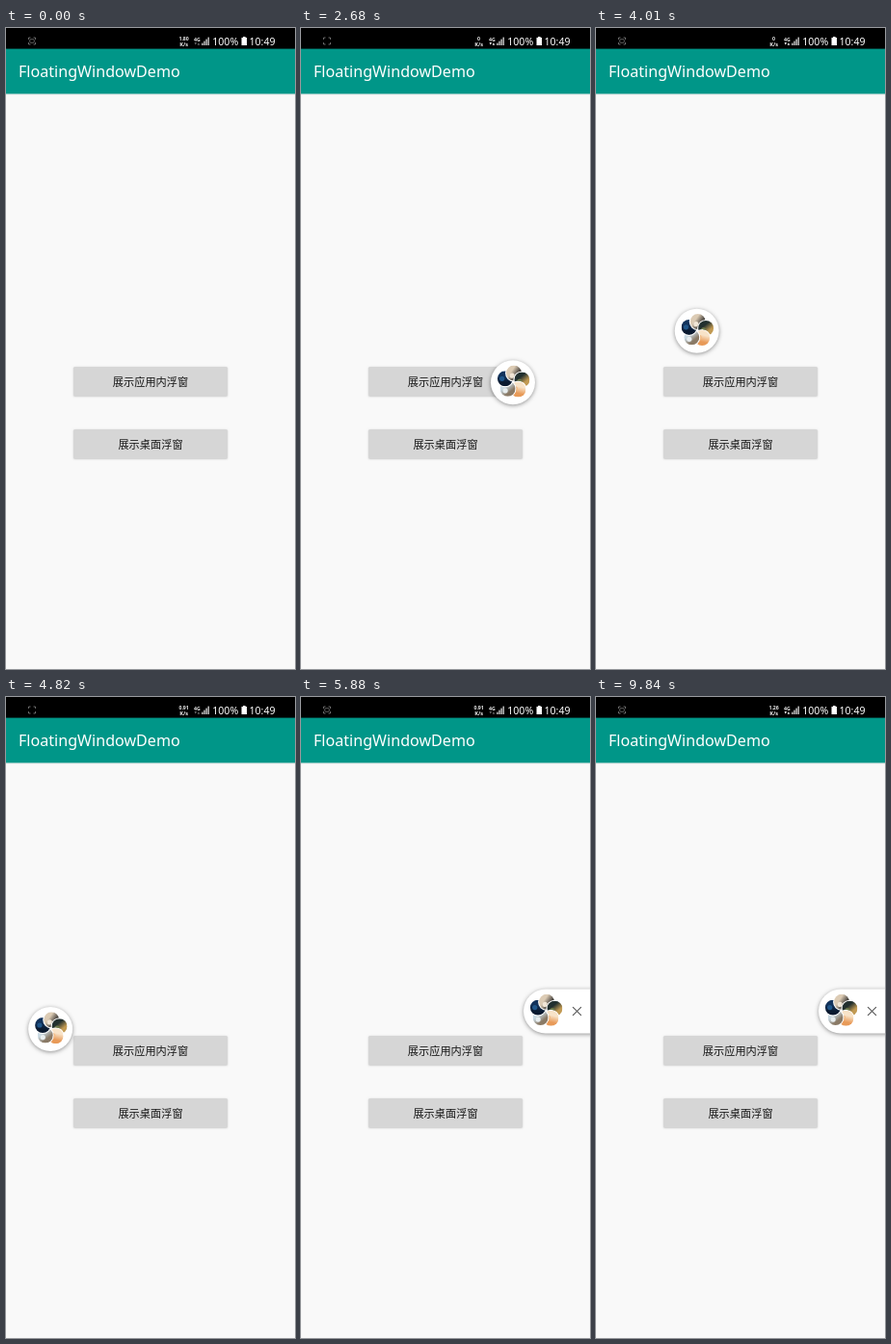
An HTML page with a canvas that plays this animation: 300x666 px, repeating every 9880 ms.

```html
<!DOCTYPE html>
<html lang="zh-CN">
<head>
<meta charset="utf-8">
<title>FloatingWindowDemo</title>
<style>
html, body { margin: 0; width: 100%; height: 100%; overflow: hidden; background: #f9f9f9; }
canvas { display: block; width: 300px; height: 666px; }
</style>
</head>
<body>
<canvas id="stage" width="300" height="666"></canvas>
<script>
const ctx = document.getElementById('stage').getContext('2d');
const LOOP = 9880;
const LATIN = '"Noto Sans", "Open Sans", sans-serif';
const CJK = '"Noto Sans CJK SC", "Noto Sans CJK", sans-serif';
const DOCK_RIGHT = 231, DOCK_LEFT = 23, R = 23;

// Each drag: points [time, left, centre y], then the end of the snap to an edge.
const drags = [
  { path: [[2390, 231, 456], [2520, 222, 438], [2700, 194, 360], [2880, 178, 278], [3030, 176, 242]], end: 3370, dock: DOCK_RIGHT },
  { path: [[3620, 231, 242], [3700, 222, 246], [3850, 160, 279], [4010, 82, 314.5], [4130, 44, 345]], end: 4470, dock: DOCK_LEFT },
  { path: [[4820, 23, 345], [4910, 36, 343], [5060, 130, 333], [5200, 220, 327], [5280, 238, 326.5], [5310, 240, 326.5]], end: 5620, dock: DOCK_RIGHT }
];

// Base tone, second tone, direction between them, and a spot of a third tone.
const photos = [
  ['#dccbb4', '#45413c', 0.6, '#f1e6d6'],
  ['#22302f', '#c29a52', 0.9, '#6b7a4a'],
  ['#f8e3c8', '#e89a58', 1.8, '#f2b980'],
  ['#c9d9e2', '#8a7a66', 0.9, '#e8eef0'],
  ['#12335c', '#0a1a30', 1.6, '#1f568a']
];

const clamp = v => Math.max(0, Math.min(1, v));
const mix = (a, b, p) => a + (b - a) * p;

function along(path, t) {
  let i = 0;
  while (i < path.length - 2 && t >= path[i + 1][0]) i++;
  const a = path[i], b = path[i + 1];
  const p = clamp((t - a[0]) / (b[0] - a[0]));
  return [mix(a[1], b[1], p), mix(a[2], b[2], p)];
}

function floatState(t) {
  let state = { x: DOCK_RIGHT, y: 456, side: 1 };
  for (const d of drags) {
    if (t < d.path[0][0]) break;
    const last = d.path[d.path.length - 1];
    if (t < last[0]) {
      const [x, y] = along(d.path, t);
      state = { x, y, side: 0 };
    } else {
      const p = 1 - Math.pow(1 - clamp((t - last[0]) / (d.end - last[0])), 3);
      state = { x: mix(last[1], d.dock, p), y: last[2], side: d.dock === DOCK_RIGHT ? 1 : -1 };
    }
  }
  return state;
}

function text(str, x, y, font, color, align = 'left') {
  ctx.font = font;
  ctx.fillStyle = color;
  ctx.textAlign = align;
  ctx.fillText(str, x, y);
}

function rect(x, y, w, h, color) {
  ctx.fillStyle = color;
  ctx.fillRect(x, y, w, h);
}

function disc(x, y, r, color) {
  ctx.fillStyle = color;
  ctx.beginPath();
  ctx.arc(x, y, r, 0, 7);
  ctx.fill();
}

function line(color, width, ...points) {
  ctx.strokeStyle = color;
  ctx.lineWidth = width;
  ctx.beginPath();
  points.forEach(([x, y]) => ctx.lineTo(x, y));
  ctx.stroke();
}

function poly(color, ...points) {
  ctx.fillStyle = color;
  ctx.beginPath();
  points.forEach(([x, y]) => ctx.lineTo(x, y));
  ctx.fill();
}

function shadow(alpha, blur, dy) {
  ctx.shadowColor = `rgba(0,0,0,${alpha})`;
  ctx.shadowBlur = blur;
  ctx.shadowOffsetY = dy;
}

function statusBar(t) {
  rect(0, 0, 300, 21.6, '#000');

  // blinking recorder icon
  for (const sx of [-1, 1]) for (const sy of [-1, 1]) {
    const x = 27 + sx * 3.5, y = 13.5 + sy * 3.5;
    line('#6a6a6a', 1, [x - sx * 2, y], [x, y], [x, y - sy * 2]);
  }
  if ((t + 162) % 1000 < 512) {
    ctx.strokeStyle = '#6a6a6a';
    ctx.lineWidth = 0.9;
    ctx.beginPath();
    ctx.ellipse(27, 13.5, 2.6, 1.9, 0, 0, 7);
    ctx.stroke();
  }

  const speed = t < 1200 ? '1.80' : t < 4200 ? '0' : t < 7200 ? '0.91' : '1.26';
  text(speed, 184.6, 13.4, `600 5.2px ${LATIN}`, '#eee', 'center');
  text('K/s', 184.6, 18.6, `600 5.6px ${LATIN}`, '#eee', 'center');

  text('4G', 198.4, 13.6, `600 5.2px ${LATIN}`, '#eee', 'center');
  const busy = (t >= 2450 && t < 4430) || (t >= 6430 && t < 7500) || t >= 8480;
  const arrow = busy ? '#eee' : '#666';
  poly(arrow, [195.6, 15], [198, 15], [196.8, 17.8]);
  poly(arrow, [198.7, 17.8], [201.1, 17.8], [199.9, 15]);

  for (let i = 0; i < 4; i++) {
    const h = 2.4 + i * 2;
    rect(203.2 + i * 2.1, 18 - h, 1.4, h, '#ccc');
  }
  text('100%', 214.2, 18, `500 10.6px ${LATIN}`, '#fff');
  rect(246, 9, 2.6, 1.4, '#fff');
  rect(244.5, 10, 5.5, 8, '#fff');
  text('10:49', 252.6, 18, `500 10.5px ${LATIN}`, '#fff');
}

function toolbar() {
  const g = ctx.createLinearGradient(0, 68, 0, 70.5);
  g.addColorStop(0, 'rgba(0,0,0,.1)');
  g.addColorStop(1, 'rgba(0,0,0,0)');
  rect(0, 68, 300, 2.5, g);
  rect(0, 21, 300, 47.4, '#009688');
  text('FloatingWindowDemo', 13, 51, `16.1px ${LATIN}`, '#fff');
}

function button(y, label, press) {
  const shape = new Path2D();
  shape.roundRect(70, y, 160, 30.6, 1.5);
  ctx.save();
  shadow(0.18, 2, 0.5);
  ctx.fillStyle = '#d6d6d6';
  ctx.fill(shape);
  ctx.restore();
  if (press > 0 && press < 1) {
    ctx.save();
    ctx.clip(shape);
    const fade = 1 - clamp((press - 0.4) / 0.6);
    rect(70, y, 160, 31, `rgba(0,0,0,${0.06 * fade})`);
    disc(150, y + 15.5, mix(12, 84, clamp(press * 1.5)), `rgba(0,0,0,${0.08 * fade})`);
    ctx.restore();
  }
  text(label, 150, y + 19.8, `500 11.2px ${CJK}`, '#161616', 'center');
}

function avatars(cx, cy) {
  const r = 8;
  const spot = i => {
    const a = -Math.PI / 2 + 0.06 + i * Math.PI * 0.4;
    return [cx + 9.2 * Math.cos(a), cy + 9.2 * Math.sin(a)];
  };
  photos.forEach(([base, tone, dir, accent], i) => {
    const [x, y] = spot(i), [nx, ny] = spot(i + 1);
    const face = new Path2D(), cut = new Path2D();
    face.arc(x, y, r, 0, 7);
    cut.rect(cx - 30, cy - 30, 60, 60);
    cut.moveTo(nx + r + 1, ny);
    cut.arc(nx, ny, r + 1, 0, Math.PI * 2);
    const dx = Math.cos(dir) * r, dy = Math.sin(dir) * r;
    const g = ctx.createLinearGradient(x - dx, y - dy, x + dx, y + dy);
    g.addColorStop(0.3, base);
    g.addColorStop(0.75, tone);
    ctx.save();
    ctx.clip(cut, 'evenodd');
    ctx.clip(face);
    rect(x - r, y - r, r * 2, r * 2, g);
    disc(x - dy * 0.4, y + dx * 0.4, 2.6, accent);
    ctx.restore();
  });
}

function floatWindow({ x, y, side }) {
  const cx = x + R;
  ctx.save();
  shadow(0.42, 4.5, 1);
  ctx.fillStyle = '#fff';
  ctx.beginPath();
  if (side === 0) {
    ctx.arc(cx, y, R, 0, 7);
  } else {
    const flat = cx + side * 50;
    ctx.moveTo(flat, y - R);
    ctx.lineTo(cx, y - R);
    ctx.arc(cx, y, R, -Math.PI / 2, Math.PI / 2, side > 0);
    ctx.lineTo(flat, y + R);
    ctx.closePath();
  }
  ctx.fill();
  ctx.restore();

  avatars(cx + 0.5, y - 0.5);
  if (side) {
    const k = cx + side * 32.5, h = 4.4;
    line('#555', 1.1, [k - h, y - h], [k + h, y + h]);
    line('#555', 1.1, [k - h, y + h], [k + h, y - h]);
  }
}

function draw(t) {
  rect(0, 0, 300, 666, '#f9f9f9');
  toolbar();
  statusBar(t);
  button(352, '展示应用内浮窗', (t - 810) / 560);
  button(417, '展示桌面浮窗', 0);
  if (t >= 930) floatWindow(floatState(t));
}

const start = performance.now();
function tick() {
  draw((performance.now() - start) % LOOP);
  requestAnimationFrame(tick);
}
tick();
</script>
</body>
</html>
```
